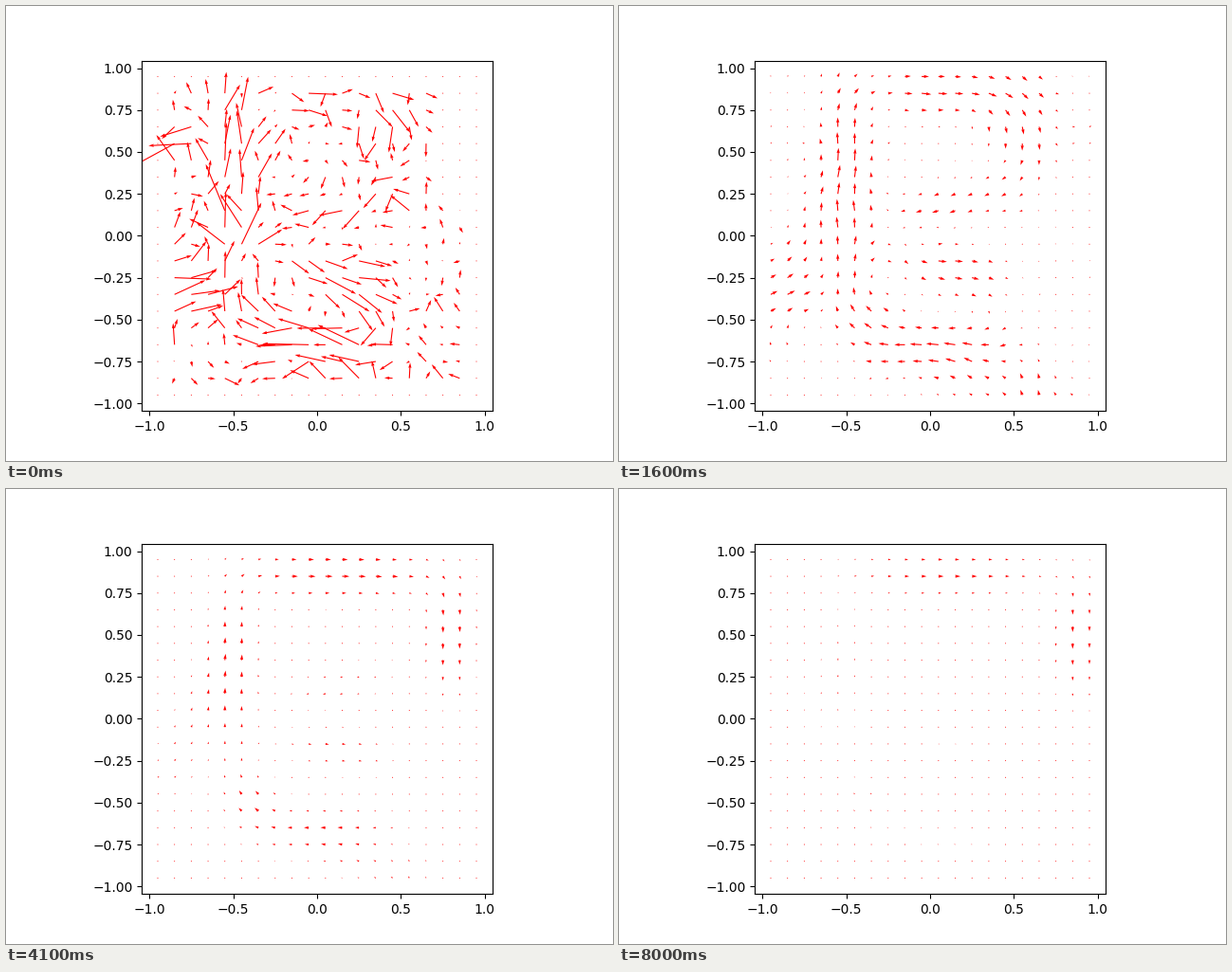
Animation of 640x480 px, one loop 8050 ms. Source, as a matplotlib script:

```python
import numpy as np
import matplotlib.pyplot as plt
from matplotlib.animation import FuncAnimation

FRAMES, STEP = 161, 50
WIDTH = 0.11  # jet spread across its direction

axis = np.linspace(-0.95, 0.95, 20)
x, y = np.meshgrid(axis, axis)
border = np.maximum(abs(x), abs(y)) > 0.9
still = border | ((x > 0.7) & (y > 0.2))

# Fading jets: centre, velocity in pixels, length, lifetime in ms
JETS = [
    (-0.50, 0.30, 0, 20, 0.42, 3300),
    (-0.72, 0.05, 3, 7, 0.35, 4500),
    (-0.90, -0.38, 17, 6, 0.20, 1500),
    (-0.42, -0.20, 6, 8, 0.14, 1500),
    (-0.38, -0.50, -8, 9, 0.13, 4500),
    (0.02, -0.67, -20, -1, 0.33, 2800),
    (0.30, -0.88, -6, 3, 0.25, 4000),
    (0.58, -0.88, -2, 15, 0.12, 2000),
    (0.10, -0.17, 12, -2, 0.27, 3500),
    (0.20, -0.38, 9, -6, 0.25, 1000),
    (0.10, 0.18, -13, -4, 0.27, 2800),
    (0.12, 0.87, 11, 0, 0.42, 12000),
    (0.37, 0.78, 2, -16, 0.17, 1300),
    (-0.85, 0.55, -26, 0, 0.12, 150),
]


def jet(cx, cy, u, v, length):
    """Velocity of one jet, stretched along its own direction."""
    speed = np.hypot(u, v)
    along = ((x - cx) * u + (y - cy) * v) / speed
    across = ((y - cy) * u - (x - cx) * v) / speed
    shape = np.exp(-(along / length) ** 2 / 2 - (across / WIDTH) ** 2 / 2)
    return np.array([u * shape, v * shape])


def blur(field):
    for ax_id in (1, 2):
        field = (np.roll(field, 1, ax_id) + 2 * field
                 + np.roll(field, -1, ax_id)) / 4
    return field


rng = np.random.default_rng(4)
noise = rng.normal(size=(2, 20, 20))
eddies = blur(rng.normal(size=(2, 20, 20)))
eddies *= 3.5 / eddies.std()
steady = [(jet(*spec), life) for *spec, life in JETS]


def flow(t):
    field = sum(v * np.exp(-t / life) for v, life in steady)
    # The right-hand downflow drifts outwards to the wall
    shift = np.exp(-(t / 3500) ** 2)
    field += jet(0.88 - 0.36 * shift, 0.5 + 0.1 * shift, 0, -8, 0.28) \
        * np.exp(-t / 30000)
    field += eddies * np.exp(-t / 1200)

    # Rough start: stronger where the flow is fast, calm at the walls
    kick = np.exp(-t / 120)
    rough = 3 + 0.35 * np.hypot(*field)
    field += kick * (0.5 * field + rough * noise)
    return field * (1 - kick * still)


fig, ax = plt.subplots(figsize=(6.4, 4.8), dpi=100)
ax.set(xlim=(-1.045, 1.045), ylim=(-1.045, 1.045), aspect="equal")
ax.set_xticks(np.linspace(-1, 1, 5))
ax.set_yticks(np.linspace(-1, 1, 9))
ax.xaxis.set_major_formatter("{x:.1f}")
ax.yaxis.set_major_formatter("{x:.2f}")

arrows = ax.quiver(x, y, *flow(0), color="red",
                   scale=1, scale_units="dots", width=0.003)


def update(n):
    arrows.set_UVC(*flow(n * STEP))
    return arrows,


anim = FuncAnimation(fig, update, frames=FRAMES, interval=STEP,
                     repeat=True, repeat_delay=0)
plt.show()
```
